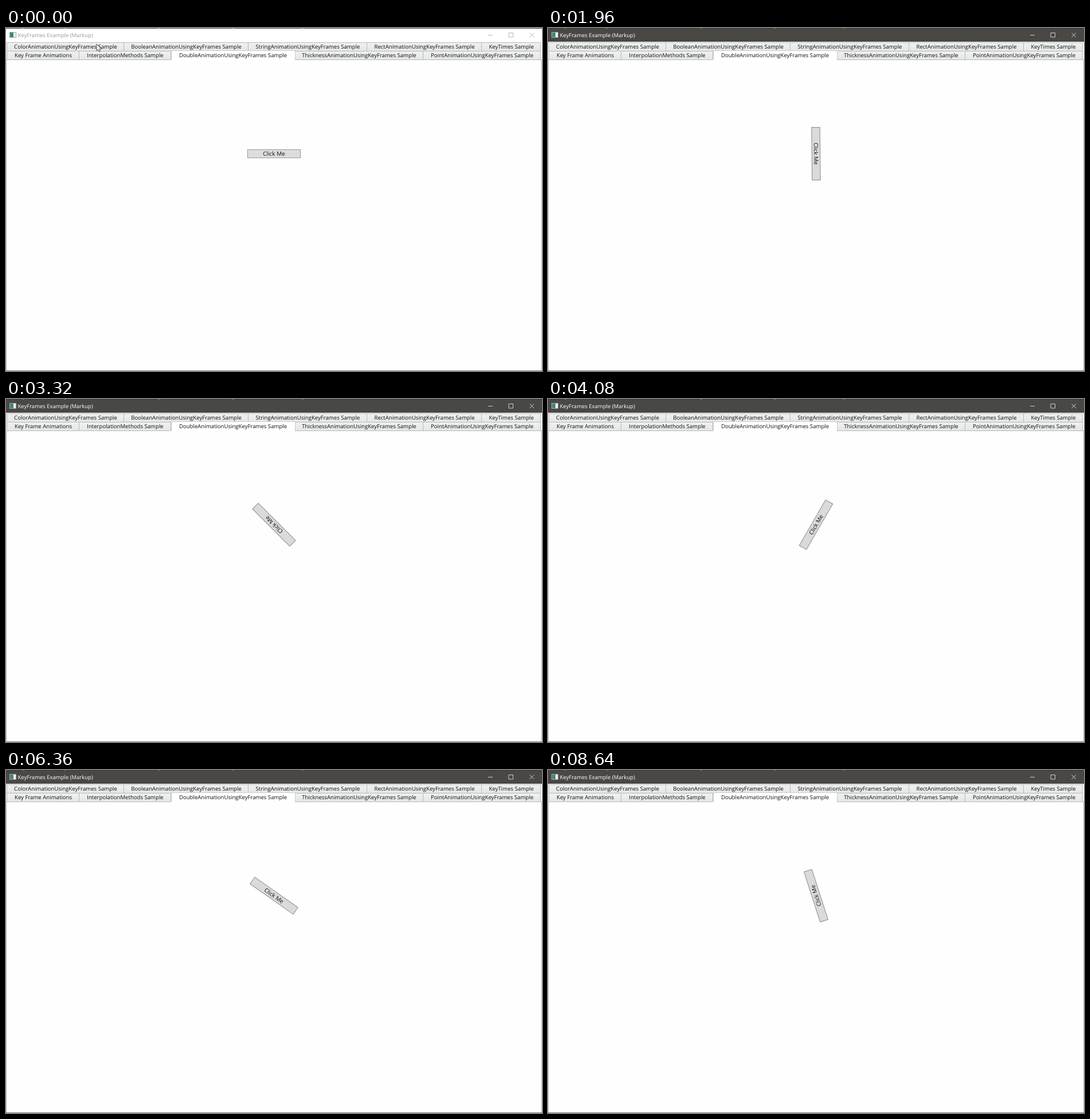
Animation of 935 by 599 pixels, one loop 8800 ms. Source, as an HTML page:

```html
<!DOCTYPE html>
<html lang="en">
<head>
<meta charset="utf-8">
<title>KeyFrames Example (Markup)</title>
<style>
  html, body { margin: 0; width: 100%; height: 100%; overflow: hidden; background: #fff; }
  svg { display: block; }
  text { font-family: "Open Sans", "Noto Sans", sans-serif; font-size: 9.6px; fill: #111; text-rendering: geometricPrecision; }
  .tabs text, #button text { text-anchor: middle; }
  #button text { font-size: 10px; }
  #button rect { fill: #dadada; stroke: #8a8a8a; }
  #bar { fill: #4a4845; }
  #caption { fill: #fff; font-size: 9.5px; }
  #controls { stroke: #cfcfcf; fill: none; }
  .inactive #bar { fill: #fff; }
  .inactive #caption { fill: #999; }
  .inactive #controls { stroke: #b4b4b4; }
  .inactive #button rect { fill: #dfdce0; stroke: #969396; }
</style>
</head>
<body>
<svg id="stage" width="935" height="599" viewBox="0 0 935 599">
  <defs>
    <linearGradient id="tabFill" x2="0" y2="1">
      <stop stop-color="#f0f1f1"/><stop offset="1" stop-color="#e4e6e5"/>
    </linearGradient>
  </defs>
  <rect width="935" height="599" fill="#fefefe"/>
  <rect id="bar" width="935" height="24"/>
  <path d="M0 .5H935" stroke="#3a3935"/>
  <path d="M28 .5h4M101 .5h4M265 .5h4M394 .5h4M515 .5h4" stroke="#857526"/>
  <rect x="6.5" y="7.5" width="11" height="9" fill="#f4f4f4" stroke="#a2a8a8"/>
  <rect x="7" y="8" width="6" height="8" fill="#3f877b"/>
  <text id="caption" x="20.5" y="15.5">KeyFrames Example (Markup)</text>
  <path id="controls" d="M841 12.5h8M877 8.5h7.5v7.5h-7.5zM913.5 8.5l7.5 7.5M921 8.5l-7.5 7.5"/>
  <g class="tabs" id="tabs"></g>
  <path d="M.5 55.5H288M504 55.5H934.5V598M.5 55.5V598" fill="none" stroke="#b8b8b8"/>
  <path d="M0 598.5H935" stroke="#777"/>
  <g id="button">
    <rect x="-46" y="-7.2" width="92" height="14.4"/>
    <text y="3.6">Click Me</text>
  </g>
  <path id="cursor" d="M0 0V12L2.8 9.4L4.6 13.4L6.5 12.6L4.7 8.7H8.5Z" fill="#fff" stroke="#222" stroke-width=".8"/>
</svg>
<script>
const $ = id => document.getElementById(id);
const LOOP = 8800, TICK = 152.4, PHASE = 100;

const rows = [
  { y: 25.5, edges: [2, 206, 423, 630, 830, 933],
    names: ["ColorAnimationUsingKeyFrames Sample", "BooleanAnimationUsingKeyFrames Sample",
      "StringAnimationUsingKeyFrames Sample", "RectAnimationUsingKeyFrames Sample", "KeyTimes Sample"] },
  { y: 40.5, edges: [2, 128, 288, 504, 728, 933],
    names: ["Key Frame Animations", "InterpolationMethods Sample", "DoubleAnimationUsingKeyFrames Sample",
      "ThicknessAnimationUsingKeyFrames Sample", "PointAnimationUsingKeyFrames Sample"] },
];

function tab(name, left, right, y) {
  const selected = name.startsWith("Double");
  const box = selected
    ? `<rect x="${left}" y="39" width="${right - left}" height="17" fill="#fff"/>
       <path d="M${left}.5 55V39.5H${right}.5V55" fill="none" stroke="#ccc"/>`
    : `<rect x="${left - .5}" y="${y}" width="${right - left}" height="15" fill="url(#tabFill)" stroke="#b8bab9"/>`;
  return `${box}<text x="${(left + right) / 2}" y="${y + (selected ? 10 : 10.7)}">${name}</text>`;
}

const tabs = rows.flatMap(({ y, edges, names }) =>
  names.map((name, i) => tab(name, edges[i], edges[i + 1], y)));
// The selected tab overlaps its neighbours, so it goes last.
tabs.push(...tabs.splice(7, 1));
$("tabs").innerHTML = tabs.join("");

// Linear turn, two discrete steps, then a spline running into a slow steady turn.
function angle(t) {
  if (t < 1025) return 0;
  if (t < 4600) return Math.min(300, (t - 1025) * .0989);
  if (t < 5100) return 225;
  const begin = 5586, end = 6599, speed = -.053;
  if (t < begin) return 180;
  if (t > end) return (t - end) * speed;
  const s = (t - begin) / (end - begin);
  return 180 * (2 * s ** 3 - 3 * s * s + 1) + speed * (end - begin) * (s ** 3 - s * s);
}

function draw(t) {
  const step = Math.floor((t - PHASE) / TICK);
  const held = step < 0 ? 0 : PHASE + step * TICK;
  $("stage").classList.toggle("inactive", held < 1000);
  $("button").setAttribute("transform", `translate(467.5 219.5) rotate(${angle(held)})`);

  const p = Math.min(1, held / 900), ease = p * p * (3 - 2 * p);
  $("cursor").setAttribute("transform", `translate(${158 + 310 * ease} ${28 + 190 * ease})`);
  $("cursor").style.display = held < 1100 ? "" : "none";
}

const start = performance.now();
function frame() {
  draw((performance.now() - start) % LOOP);
  requestAnimationFrame(frame);
}
frame();
</script>
</body>
</html>
```
